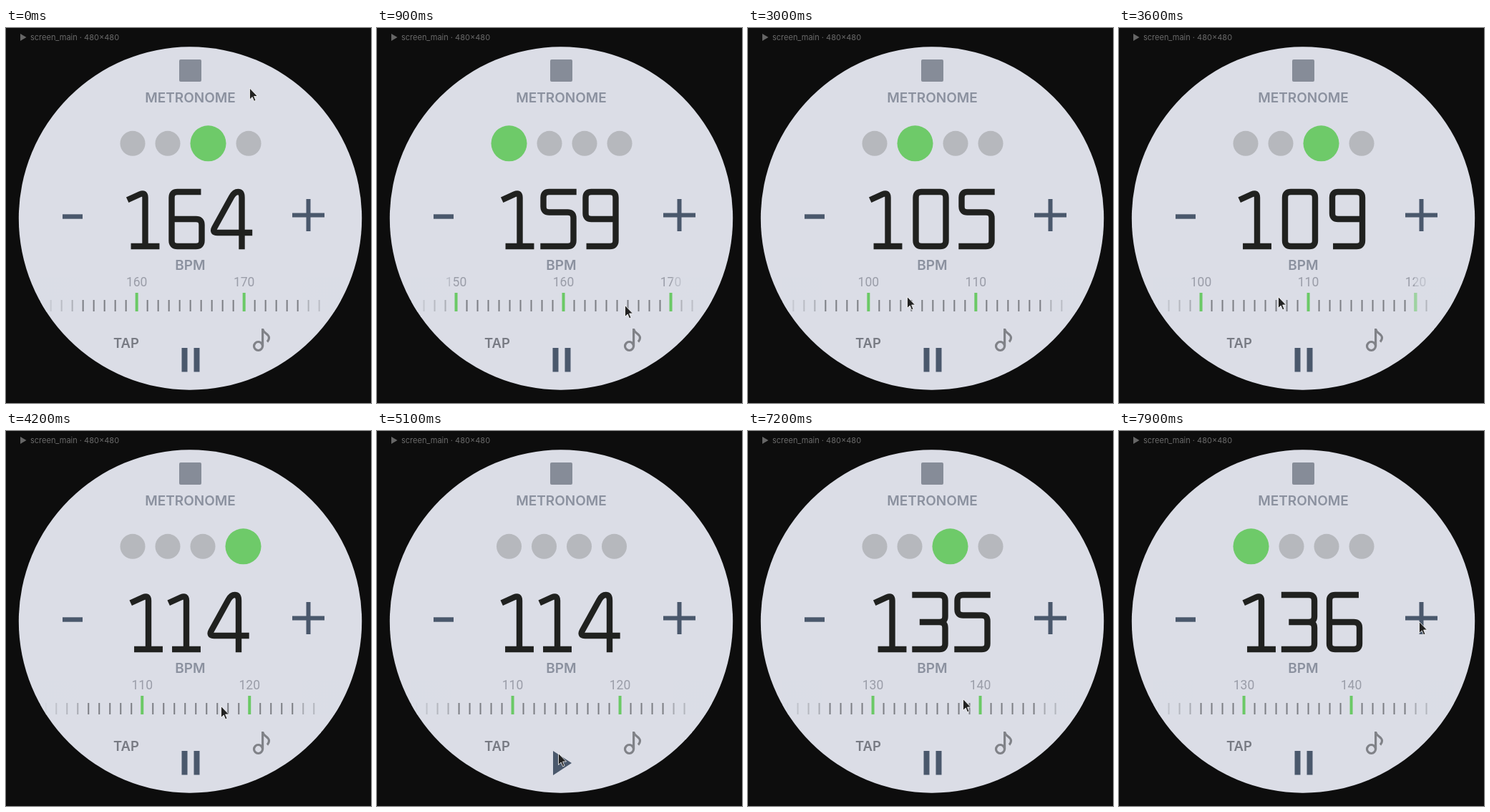
These frames come from a looping animation (510 px wide and 524 px high, 8 s). An HTML page:

```html
<!DOCTYPE html>
<html lang="en">
<head>
<meta charset="utf-8">
<title>Metronome</title>
<style>
  html, body { margin: 0; width: 100%; height: 100%; overflow: hidden; background: #0d0d0d; }
  svg { display: block; width: 100vw; height: 100vh; }
  text { font-family: Inter, "Open Sans", sans-serif; }
  .caption { font-size: 19px; font-weight: 600; text-anchor: middle; fill: #8b919f; }
  .mark { font: 17.5px Roboto, sans-serif; text-anchor: middle; fill: #9a9da8; }
</style>
</head>
<body>
<svg viewBox="0 0 510 524">
  <defs>
    <clipPath id="window"><rect x="55.5" y="340" width="386.5" height="60"/></clipPath>
    <clipPath id="dial"><circle cx="257.5" cy="266" r="239.7"/></clipPath>
    <linearGradient id="fade">
      <stop offset="0" stop-color="#dadde6" stop-opacity=".45"/>
      <stop offset="1" stop-color="#dadde6" stop-opacity=".9"/>
    </linearGradient>
  </defs>
  <path d="M20 8L28.5 13L20 18Z" fill="#666"/>
  <text x="34" y="17" font-size="11" fill="#6a6a6a">screen_main · 480×480</text>

  <circle cx="257.5" cy="266" r="239.7" fill="#dbdde6"/>
  <rect x="242" y="44" width="31" height="31" rx="2" fill="#868c98"/>
  <text class="caption" x="257.5" y="103.5">METRONOME</text>
  <g id="dots"></g>

  <g id="number" role="img" fill="none" stroke="#20211f" stroke-width="8.4" stroke-linecap="square"></g>
  <text class="caption" x="257.5" y="337.5">BPM</text>
  <g fill="#4a586c">
    <rect x="79" y="260.3" width="28" height="6.4"/>
    <path d="M419.5 239h6v19.5h19.5v6h-19.5v19.5h-6v-19.5h-19.5v-6h19.5z"/>
    <path id="toggle"/>
  </g>

  <g id="ruler" clip-path="url(#window)"></g>
  <g clip-path="url(#dial)">
    <rect x="413" y="348" width="55" height="49" fill="url(#fade)"/>
    <rect x="413" y="348" width="55" height="49" fill="url(#fade)" transform="matrix(-1 0 0 1 516 0)"/>
  </g>

  <text class="caption" x="168" y="447" style="font-size:18.5px;fill:#777a83">TAP</text>
  <g fill="none" stroke="#808288" stroke-width="3.2">
    <circle cx="352.5" cy="444.5" r="6"/>
    <path d="M358.6 445V420C359 427 367.5 426.5 367.5 433Q367.5 436 365 438.5"/>
  </g>
  <path id="cursor" d="M.5 .5V16.5L4.2 13L6.6 18.8L9 17.800L6.600 12H11.500Z" fill="#222" stroke="#fff" stroke-width=".8"/>
</svg>
<script>
const $ = id => document.getElementById(id);
const LOOP = 8000, STEP = 100, CENTER = 257.5, PITCH = 15;
const PAUSE = 'M245.5 447h8v33.500h-8zM262.500 447h8v33.500h-8z';
const PLAY = 'M246 447L272 464L246 481Z';
const STOPPED = [5000, 5950], PRESS = 7900;

// Digits: strokes through grid points (column letter, row number), left bearing, advance
const GLYPHS = [
  ['e0i0i8a8a0e0', 10, 70],
  ['a1e0e8 b8h8', 3, 53],
  ['a0i0i3a5a8i8', 5, 57],
  ['a0i0i4c4 c4i4i8a8', 3, 58],
  ['k6a6g0i0i8', 2, 67],
  ['i0a0a3i3i8a8', 4, 57],
  ['h0a0a8i8i4a4', 8, 62],
  ['a0i0d8', 1, 51],
  ['e0i0i8a8a0e0 a4i4', 7, 63],
  ['i4a4a0i0i8b8', 6, 62]
];

// Ruler swipes: [start, duration, change in bpm]
const SWIPES = [
  [0, 200, -0.46], [750, 650, -35], [1800, 600, -25], [2800, 570, 5],
  [3700, 530, 5], [6400, 300, 3], [6700, 500, 18]
];
// Pointer moves: [start, duration, x, y]
const MOVES = [
  [100, 800, 346, 387], [1000, 800, 389, 382], [1800, 200, 440, 382], [2000, 400, 243, 376],
  [2800, 200, 222, 375], [3700, 500, 300, 384], [4400, 200, 253, 450],
  [5900, 800, 213, 371], [6700, 200, 150, 372], [6900, 300, 300, 374], [7300, 400, 419, 266]
];

const ease = (t, start, time) => {
  const p = Math.min(1, Math.max(0, (t - start) / time));
  return p * p * (3 - 2 * p);
};

const tempoAt = t => SWIPES.reduce((v, [start, time, change]) => v + change * ease(t, start, time), 164.99);

const pointerAt = t => MOVES.reduce(([x, y], [start, time, toX, toY]) => {
  const p = ease(t, start, time);
  return [x + (toX - x) * p, y + (toY - y) * p];
}, [340, 83.5]);

// Lit dot: the tempo summed over the time played, -1 while stopped
function beatAt(t) {
  const [stop, resume] = STOPPED, dt = 10;
  if (t >= stop && t < resume) return -1;
  let phase = t < stop ? 2.507 : 0;
  for (let s = t < stop ? 0 : resume; s < t; s += dt) phase += tempoAt(s + dt / 2) * dt / 60000;
  return Math.floor(phase) % 4;
}

// Polyline through grid points with rounded corners
function strokePath(codes) {
  const pts = codes.match(/../g).map(([col, row]) => [4 + 5.25 * (col.charCodeAt(0) - 97), 4 + 9.5 * row]);
  const toward = (a, b) => {
    const k = Math.min(0.5, 8 / Math.hypot(b[0] - a[0], b[1] - a[1]));
    return a.map((v, i) => v + (b[i] - v) * k);
  };
  const corners = pts.slice(1, -1).map((p, i) => `L${toward(p, pts[i])}Q${p} ${toward(p, pts[i + 2])}`);
  return `M${pts[0]}${corners.join('')}L${pts[pts.length - 1]}`;
}

function drawDots(lit) {
  let x = lit < 0 ? 167 : 159.5, out = '';
  for (let i = 0; i < 4; i++) {
    const r = i === lit ? 25 : 17.5;
    out += `<circle cx="${x + r}" cy="161.3" r="${r}" fill="${i === lit ? '#6eca69' : '#b6b8bd'}"/>`;
    x += 2 * r + 14;
  }
  $('dots').innerHTML = out;
}

function drawNumber(value) {
  const digits = [...String(value)].map(d => GLYPHS[d]);
  let x = CENTER - digits.reduce((w, g) => w + g[2], 0) / 2;
  $('number').innerHTML = digits.map(([strokes, bearing, advance]) => {
    const at = x + bearing;
    x += advance;
    return `<path d="${strokes.split(' ').map(strokePath).join('')}" transform="translate(${at} 225)"/>`;
  }).join('');
  $('number').setAttribute('aria-label', value);
}

function drawRuler(value) {
  let out = '';
  for (let n = Math.floor(value) - 15; n <= value + 15; n++) {
    const x = CENTER + PITCH * (n - value);
    out += n % 10 === 0
      ? `<rect x="${x - 2}" y="370" width="4" height="26" fill="#6bc966"/><text class="mark" x="${x}" y="361.3">${n}</text>`
      : `<rect x="${x - 1}" y="380" width="2" height="16" fill="#7c7e84"/>`;
  }
  $('ruler').innerHTML = out;
}

function render(t) {
  const tempo = tempoAt(t), lit = beatAt(t);
  drawDots(lit);
  drawNumber(Math.floor(tempo) + (t >= PRESS ? 1 : 0));
  drawRuler(tempo);
  $('toggle').setAttribute('d', lit < 0 ? PLAY : PAUSE);
  $('cursor').setAttribute('transform', `translate(${pointerAt(t)})`);
}

let start, last = -1;
function frame(now) {
  start ??= now;
  const t = Math.floor((now - start) % LOOP / STEP) * STEP;
  if (t !== last) render(last = t);
  requestAnimationFrame(frame);
}
render(0);
requestAnimationFrame(frame);
</script>
</body>
</html>
```
